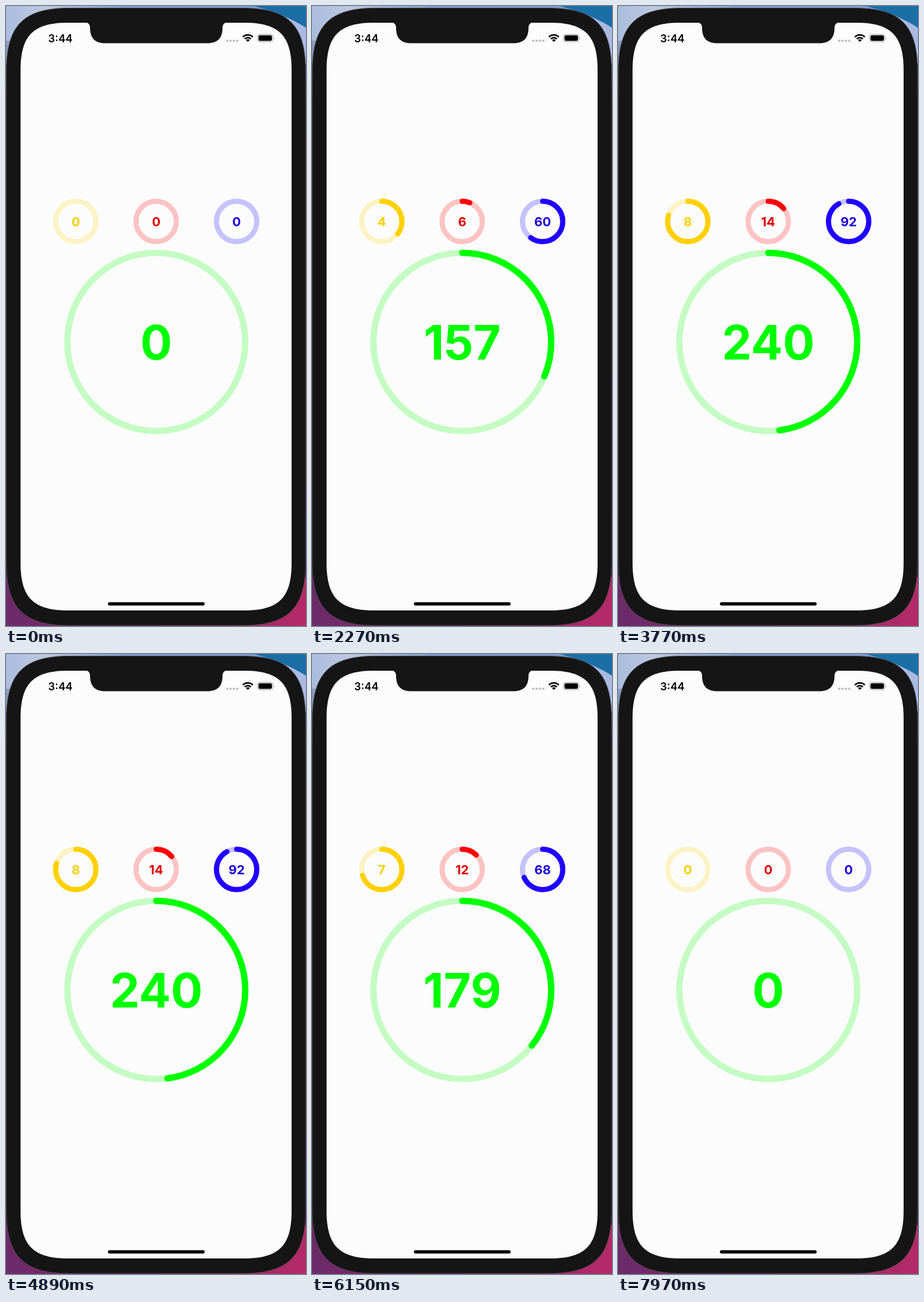
An HTML page that plays this animation: 521 by 1075 pixels, repeating every 7990 ms.

```html
<!DOCTYPE html>
<html lang="en">
<head>
<meta charset="utf-8">
<title>Progress rings</title>
<style>
  html, body { margin: 0; width: 100%; height: 100%; overflow: hidden; background: #151515; }
  svg { display: block; width: 100%; height: 100%; }
  text { font-family: Inter, "Liberation Sans", sans-serif; font-weight: 700; text-anchor: middle; }
  .ring { fill: none; }
  .arc { stroke-linecap: round; }
</style>
</head>
<body>
<svg viewBox="0 0 521 1075">
  <defs>
    <linearGradient id="sides" x2="0" y2="1">
      <stop offset="0" stop-color="#a9bbdc"/>
      <stop offset=".08" stop-color="#8490b4"/>
      <stop offset=".16" stop-color="#3a2434"/>
      <stop offset=".5" stop-color="#40202e"/>
      <stop offset=".9" stop-color="#4c2450"/>
      <stop offset="1" stop-color="#7c2c70"/>
    </linearGradient>
    <linearGradient id="sky">
      <stop offset="0" stop-color="#a9bddd"/>
      <stop offset=".12" stop-color="#bcc8e0"/>
      <stop offset=".4" stop-color="#7f9fcb"/>
      <stop offset=".8" stop-color="#7d9fce"/>
    </linearGradient>
    <linearGradient id="floor">
      <stop offset="0" stop-color="#6b2a68"/>
      <stop offset=".5" stop-color="#8c2c70"/>
      <stop offset="1" stop-color="#b42a68"/>
    </linearGradient>
  </defs>

  <rect width="521" height="1075" fill="url(#sides)"/>
  <rect width="521" height="60" fill="url(#sky)"/>
  <path d="M430 0H521V38Q485 14 430 0Z" fill="#1b6ea6"/>
  <path d="M521 38V100H480V18Q504 26 521 38Z" fill="#a9b9e2"/>
  <rect y="990" width="521" height="85" fill="url(#floor)"/>

  <path id="body" fill="#151515" stroke="#4a4a4c" stroke-width=".8"/>
  <path id="screen" fill="#fcfcfc"/>
  <path d="M138 28.5Q146 29 146 38C146 55 154 64.500 172 64.500H350C368 64.500 376 55 376 38Q376 29 384 28.500Z" fill="#151515"/>

  <text x="94.500" y="62.500" style="font-size:18.500px;font-weight:600">3:44</text>
  <g fill="#c0c0c2">
    <circle cx="384.200" cy="60.300" r="2.100"/><circle cx="390" cy="60.300" r="2.100"/>
    <circle cx="395.900" cy="60.300" r="2.100"/><circle cx="401.700" cy="60.300" r="2.100"/>
  </g>
  <g fill="none" stroke="#000" stroke-width="2.600">
    <path d="M411.400 53.800A12 12 0 0 1 428.600 53.800"/>
    <path d="M414.600 57.200A7.400 7.400 0 0 1 425.400 57.200"/>
  </g>
  <path d="M420 62.300L416.700 59Q420 56.500 423.300 59Z"/>
  <rect x="436.700" y="49" width="27" height="13.200" rx="3.800" fill="none" stroke="#a2a2a4"/>
  <rect x="438.500" y="50.800" width="23.400" height="9.600" rx="2.300"/>
  <path d="M465.200 53.500Q467 55.500 465.200 57.800Z" fill="#a2a2a4"/>

  <g id="rings"></g>
  <rect x="177" y="1033.800" width="168" height="5.600" rx="2.800"/>
</svg>
<script>
const LOOP = 7990;
const RAMP = 30;

// x, y, radius, stroke, target, maximum, font size, baseline, late
const RINGS = [
  { x: 121.2, y: 373.5, r: 35, w: 9, to: 8, max: 10, size: 22, base: 381.5, late: true,
    arc: '#ffd000', track: '#fcf3c4', ink: '#f5d000' },
  { x: 260.8, y: 373.5, r: 35, w: 9, to: 14, max: 100, size: 22, base: 381.5, late: true,
    arc: '#ff0000', track: '#fcc3c3', ink: '#e00000' },
  { x: 400.5, y: 373.5, r: 35, w: 9, to: 92, max: 100, size: 22, base: 381.5,
    arc: '#2000ff', track: '#c4c3fc', ink: '#1c00d8' },
  { x: 261, y: 582.5, r: 154.5, w: 11, to: 240, max: 500, size: 82, base: 612.5,
    arc: '#00ff00', track: '#c4fcc3', ink: '#00ff00' }
];
const UP = { start: 31.29, lag: 3.67 };
const DOWN = { start: 120.496, lag: 3.2 };

function add(parent, tag, attrs) {
  const el = document.createElementNS('http://www.w3.org/2000/svg', tag);
  for (const key in attrs) el.setAttribute(key, attrs[key]);
  return parent.appendChild(el);
}

// Rounded rectangle with continuous corners
function squircle(l, t, r, b, c) {
  const k = c * 0.27;
  return `M${l + c} ${t}H${r - c}C${r - k} ${t} ${r} ${t + k} ${r} ${t + c}` +
    `V${b - c}C${r} ${b - k} ${r - k} ${b} ${r - c} ${b}` +
    `H${l + c}C${l + k} ${b} ${l} ${b - k} ${l} ${b - c}` +
    `V${t + c}C${l} ${t + k} ${l + k} ${t} ${l + c} ${t}Z`;
}

// cubic-bezier(.42, 0, .58, 1), solved by bisection
function easeInOut(x) {
  if (x <= 0) return 0;
  if (x >= 1) return 1;
  let lo = 0, hi = 1, s;
  for (let i = 0; i < 30; i++) {
    s = (lo + hi) / 2;
    const at = 1.26 * s * (1 - s) ** 2 + 1.74 * s * s * (1 - s) + s ** 3;
    if (at < x) lo = s; else hi = s;
  }
  return s * s * (3 - 2 * s);
}

// Ticks are held for 20, 100 and 20 ms in turn
function tickAt(ms) {
  const cycle = Math.floor((ms - 10) / 140);
  const phase = ms - 10 - cycle * 140;
  return cycle * 3 + (phase < 20 ? 0 : phase < 120 ? 1 : 2);
}

function ramp(tick, move, late) {
  return easeInOut((tick - move.start - (late ? move.lag : 0)) / RAMP);
}

document.getElementById('body').setAttribute('d', squircle(0.7, 3.5, 520.3, 1074, 110));
document.getElementById('screen').setAttribute('d', squircle(25.3, 29, 496, 1048, 82));

const group = document.getElementById('rings');
for (const ring of RINGS) {
  const circle = { cx: ring.x, cy: ring.y, r: ring.r, 'stroke-width': ring.w };
  add(group, 'circle', { ...circle, class: 'ring', stroke: ring.track });
  ring.arcEl = add(group, 'circle', {
    ...circle, class: 'ring arc', stroke: ring.arc, pathLength: 1,
    transform: `rotate(-90 ${ring.x} ${ring.y})`
  });
  ring.label = add(group, 'text', { x: ring.x, y: ring.base, fill: ring.ink, 'font-size': ring.size });
}

function draw() {
  const tick = tickAt(performance.now() % LOOP);
  for (const ring of RINGS) {
    const p = ramp(tick, UP, ring.late) - ramp(tick, DOWN, ring.late);
    const shown = p > 0.0005;
    ring.arcEl.setAttribute('visibility', shown ? 'visible' : 'hidden');
    if (shown) ring.arcEl.setAttribute('stroke-dasharray', `${p * ring.to / ring.max} 2`);
    ring.label.textContent = Math.round(p * ring.to);
  }
  requestAnimationFrame(draw);
}
draw();
</script>
</body>
</html>
```
